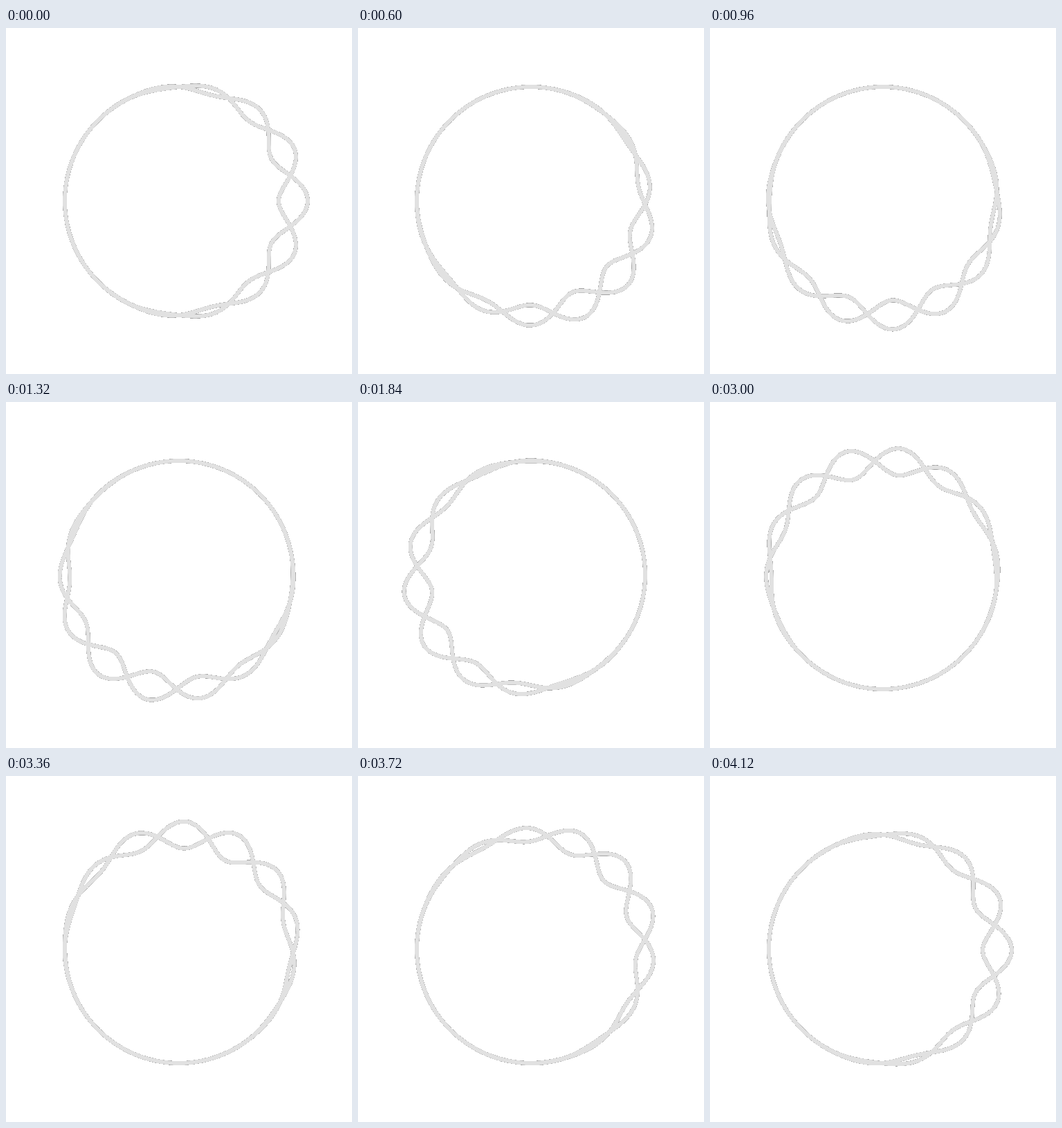
Animation, 500 px wide and 500 px high, one loop 4160 ms. Source, as an HTML page:

```html
<!DOCTYPE html>
<html lang="en">
<head>
<meta charset="utf-8">
<title>Twisted ring</title>
<style>
  html, body { margin: 0; width: 100%; height: 100%; overflow: hidden; background: #fff; }
  svg { display: block; width: 100%; height: 100%; }
  path { fill: none; stroke: #e1e1e1; stroke-width: 6.2; stroke-linejoin: round; }
</style>
</head>
<body>
<svg viewBox="0 0 500 500">
  <!-- Hard outer edge whose partly covered pixels darken into a thin rim -->
  <filter id="rim" filterUnits="userSpaceOnUse" x="0" y="0" width="500" height="500"
          color-interpolation-filters="sRGB">
    <feComponentTransfer in="SourceAlpha" result="shape">
      <feFuncA type="discrete" tableValues="0 1"/>
    </feComponentTransfer>
    <feFlood flood-color="#606060"/>
    <feComposite in2="shape" operator="in" result="matte"/>
    <feComposite in="SourceGraphic" in2="matte" operator="atop"/>
  </filter>
  <g filter="url(#rim)"><path id="strands"/></g>
</svg>
<script>
const LOOP = 4160, STEP = 40;
const CENTER = 250, RADIUS = 165, AMPLITUDE = 21, WAVES = 7, POINTS = 540;
const TAU = 2 * Math.PI;
const strands = document.getElementById('strands');

// The twist swells around a point that circles the ring while the wave drifts back.
function offset(angle, t) {
  const swell = ((1 + Math.cos(angle - TAU * t)) / 2) ** 3;
  return AMPLITUDE * swell * Math.cos(WAVES * angle + 1.5 * TAU * t);
}

function strand(side, t) {
  const points = Array.from({ length: POINTS }, (_, i) => {
    const angle = TAU * i / POINTS;
    const r = RADIUS + side * offset(angle, t);
    const x = CENTER + r * Math.cos(angle);
    const y = CENTER + r * Math.sin(angle);
    return x.toFixed(2) + ' ' + y.toFixed(2);
  });
  return 'M' + points.join('L') + 'Z';
}

function render(ms) {
  const t = Math.floor(ms % LOOP / STEP) * STEP / LOOP;
  strands.setAttribute('d', strand(1, t) + strand(-1, t));
}

const start = performance.now();
function tick() {
  render(performance.now() - start);
  requestAnimationFrame(tick);
}
tick();
</script>
</body>
</html>
```
